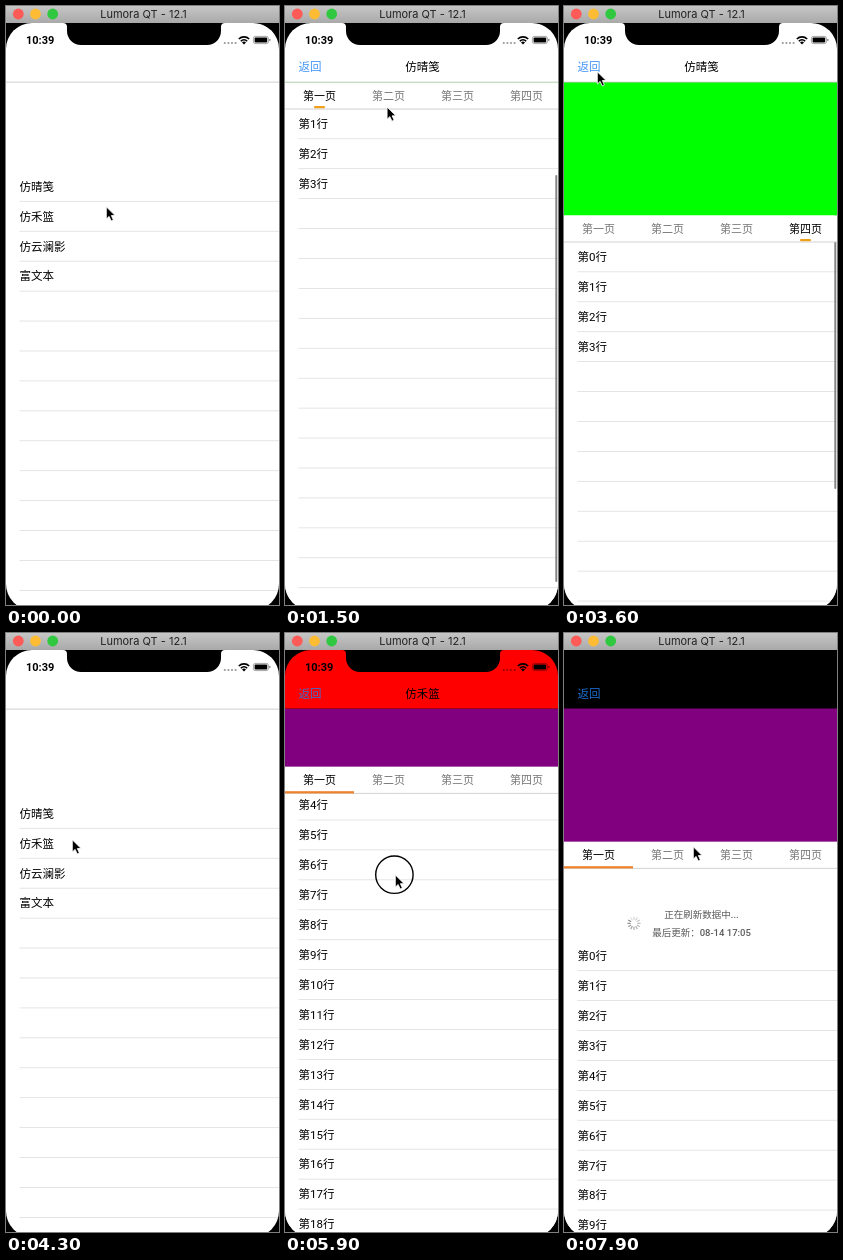
Recreate the animation shown at these times as an HTML page. Size 273x599 px, loop 8 s.

```html
<!DOCTYPE html>
<html lang="zh-CN">
<head>
<meta charset="utf-8">
<style>
  html, body { margin: 0; width: 100%; height: 100%; overflow: hidden; background: #000; }
  svg { display: block; width: 100%; height: 100%; }
  text { font-family: Roboto, "Noto Sans CJK SC", "Noto Sans CJK", sans-serif; font-size: 11.5px; white-space: pre; }
  .mid { text-anchor: middle; }
  .title { font-weight: 500; }
  .clock { font-size: 11px; font-weight: 700; }
  .tab { font-size: 11px; }
  .note { font-size: 9.5px; font-weight: 500; fill: #5a5a5a; }
  .window { font-family: Inter, sans-serif; font-size: 11px; fill: #222; }
</style>
</head>
<body>
<svg viewBox="0 0 273 599" xmlns="http://www.w3.org/2000/svg">
  <defs>
    <linearGradient id="chrome" x2="0" y2="1">
      <stop stop-color="#c6c6c6"/><stop offset="1" stop-color="#a9a9a9"/>
    </linearGradient>
    <clipPath id="screen"><rect y="17" width="273" height="587" rx="26"/></clipPath>
    <clipPath id="pane"><rect y="75" width="273" height="530"/></clipPath>
  </defs>
  <rect width="273" height="599"/>
  <g clip-path="url(#screen)">
    <rect y="76" width="273" height="530" fill="#fff"/>
    <g id="views"></g>
    <g id="navWhite">
      <rect y="17" width="273" height="59" fill="#fff"/>
      <rect y="75.7" width="273" height=".8" fill="#c4c4c4"/>
    </g>
    <rect id="navRed" y="17" width="273" height="58.5" fill="#f00"/>
    <text id="back" x="13.5" y="65.3" fill="#2080f4">返回</text>
    <text id="titleA" class="mid title" x="137.5" y="65.3">仿晴笺</text>
    <text id="titleB" class="mid title" x="137.5" y="65.3">仿禾篮</text>
    <text class="clock" x="20" y="38">10:39</text>
    <path d="M218.8 37h12" stroke="#000" stroke-opacity=".4" stroke-width="2.2" stroke-linecap="round" stroke-dasharray="0 3.6"/>
    <path d="M232.8 33a7.4 7.4 0 0 1 10.4 0M234.8 35.2a4.6 4.6 0 0 1 6.4 0" fill="none" stroke="#000" stroke-width="1.6"/>
    <path d="M238 38.6l-2-2a2.8 2.8 0 0 1 4 0z"/>
    <rect x="247.4" y="30.4" width="15" height="7.2" rx="2" fill="none" stroke="#000" stroke-opacity=".45" stroke-width=".8"/>
    <rect x="248.6" y="31.6" width="12.6" height="4.8" rx="1"/>
    <rect x="263.3" y="32.7" width="1.1" height="2.6" rx=".5" opacity=".5"/>
    <path d="M57 16v1q4 0 4 4v4a14 14 0 0 0 14 14h126a14 14 0 0 0 14-14v-4q0-4 4-4v-1z"/>
  </g>
  <rect width="273" height="17" fill="url(#chrome)"/>
  <circle cx="12.3" cy="8" r="5.4" fill="#fc5b57"/>
  <circle cx="29.5" cy="8" r="5.4" fill="#fdbc34"/>
  <circle cx="46.7" cy="8" r="5.4" fill="#2fc840"/>
  <text class="mid window" x="137.5" y="12.2">Lumora QT - 12.1</text>
  <g id="cursor">
    <circle id="ring" cx="-.6" cy=".6" r="18.7" fill="none" stroke="#000" stroke-width="1.4"/>
    <path transform="translate(.3 .8) scale(.94)" d="M0 0v13l3-2.800 2.200 4.800 2.300-1-2.100-4.700h4z" stroke="#fff" stroke-width=".9"/>
  </g>
</svg>
<script>
const LOOP = 8000, W = 273, NAV = 76, ROW = 29.93, TAB_H = 26.5, TAB_GAP = 69;
const TOP_A = 209.5, TOP_B = 208.8, FOLD_A = 133, FOLD_B = 75, REFRESH = 72.5;
const PUSH = 350, SLIDE = 250;

const $ = id => document.getElementById(id);
const clamp = v => Math.max(0, Math.min(1, v));
const mix = (a, b, u) => a + (b - a) * u;
const phase = (t, start, length) => {
  const u = clamp((t - start) / (length || 1));
  return u * u * (3 - 2 * u);
};

function add(parent, tag, attrs, label) {
  const node = document.createElementNS('http://www.w3.org/2000/svg', tag);
  for (const key in attrs) node.setAttribute(key, attrs[key]);
  if (label !== undefined) node.textContent = label;
  return parent.appendChild(node);
}
const set = (node, key, value) => node.setAttribute(key, value);
const move = (node, x, y) => set(node, 'transform', `translate(${x.toFixed(2)} ${y.toFixed(2)})`);
const fade = (node, value) => set(node, 'opacity', value);
const tabX = i => TAB_GAP * (i + .5);

// Gestures drive the pointer, the press ring, scrolling and navigation.
const drag = (at, length, x, y, dy) => ({ at, length, end: at + length, x, y, dy });
const tap = (at, x, y) => drag(at, 100, x, y, 0);
const hover = (at, x, y) => drag(at, 0, x, y, 0);
const pulled = (g, t) => g.dy * phase(t, g.at, g.length);

const openA = tap(330, 62, 184);
const foldA = drag(1045, 450, 104, 265, -163);
const tabTaps = [1, 2, 3].map(i => tap(1011 + 560 * i, tabX(i) - 16, 89));
const unfoldA = drag(3200, 200, 195, 120, FOLD_A);
const closeA = tap(3650, 33, 65);
const openB = tap(4200, 66, 206);
const dragsB = [
  drag(4695, 300, 81, 463, -159),
  drag(5300, 280, 90, 420, -120),
  drag(5700, 450, 110, 160, 193),
  drag(6400, 600, 121, 152, 166)
];
const release = dragsB[3].end;
const gestures = [hover(0, 100, 200), openA, foldA, ...tabTaps, unfoldA, closeA, openB,
  ...dragsB, hover(7950, 129, 213)];

function pointerAt(t) {
  const i = gestures.findLastIndex(g => g.at <= t);
  const now = gestures[i], next = gestures[i + 1] || now;
  const y = now.y + pulled(now, t);
  const start = Math.max(now.end, next.at - 300);
  const u = next === now ? 0 : phase(t, start, next.at - 50 - start);
  return { x: mix(now.x, next.x, u), y: mix(y, next.y, u), pressed: t < now.end };
}

function addList(parent, labels, lines) {
  const list = add(parent, 'g', {});
  for (let i = 0; i < lines; i++) {
    if (labels[i]) add(list, 'text', { x: 13.5, y: i * ROW + 19.2 }, labels[i]);
    add(list, 'rect', { x: 13.5, y: (i + 1) * ROW - .5, width: W - 13.5, height: .8, fill: '#dedede' });
  }
  return list;
}
const rowLabels = n => Array.from({ length: n }, (_, i) => `第${i}行`);

function addTabs(parent, marker) {
  const group = add(parent, 'g', {});
  add(group, 'rect', { width: W, height: TAB_H, fill: '#fff' });
  add(group, 'rect', { y: TAB_H - .4, width: W, height: .8, fill: '#c8c8c8' });
  const labels = [...'一二三四'].map((n, i) =>
    add(group, 'text', { class: 'mid tab', x: tabX(i), y: 17 }, `第${n}页`));
  return {
    group,
    marker: add(group, 'rect', { height: 2.2, ...marker }),
    select: index => labels.forEach((label, i) => set(label, 'fill', i === index ? '#000' : '#777'))
  };
}

function addView(color) {
  const view = add($('views'), 'g', { 'clip-path': 'url(#pane)' });
  add(view, 'rect', { y: NAV, width: W, height: 530, fill: '#fff' });
  const body = add(view, 'g', {});
  const header = add(view, 'rect', { y: NAV - .5, width: W, fill: color });
  return { view, body, header };
}

const home = addList($('views'), ['仿晴笺', '仿禾篮', '仿云澜影', '富文本'], 15);

const a = addView('#0f0');
const pages = [0, 1, 2, 3].map(() => addList(a.body, rowLabels(4), 18));
const scrollbar = add(a.body, 'rect', { x: 270.3, width: 2, height: 407, rx: 1, fill: '#858585' });
const tabsA = addTabs(a.view, { y: 23.6, width: 11, rx: 1, fill: '#f0a01c' });

// Black from the top edge: the red bar fades out over it.
const b = addView('#800080');
const listB = addList(b.body, rowLabels(30), 30);
const refresh = add(listB, 'g', {});
const status = add(refresh, 'text', { class: 'note mid', x: 137.5, y: -23.2 });
add(refresh, 'text', { class: 'note mid', x: 137.5, y: -5.2 }, '最后更新：08-14 17:05');
const arrow = add(refresh, 'path', { d: 'M0-9V8M-4 4L0 8l4-4', fill: 'none', stroke: '#777', 'stroke-width': 1.6 });
const spinner = add(refresh, 'g', {});
for (let i = 0; i < 12; i++) {
  add(spinner, 'rect', { x: -.6, y: -6.8, width: 1.2, height: 3.6, rx: .6, fill: '#777',
    opacity: .25 + i * .055, transform: `rotate(${i * 30})` });
}
const tabsB = addTabs(b.view, { y: 24.4, width: TAB_GAP, fill: '#f0802a' });
tabsB.select(0);

function drawA(t, shown) {
  const scroll = -pulled(foldA, t);
  const lift = Math.min(scroll, FOLD_A) - pulled(unfoldA, t);
  const page = tabTaps.reduce((sum, g) => sum + phase(t, g.end, SLIDE), 0);
  const top = TOP_A - lift;
  move(a.view, (1 - shown) * W, 0);
  pages.forEach((list, i) => move(list, (i - page) * W, TOP_A + TAB_H - (i ? lift : scroll)));
  set(scrollbar, 'y', NAV + .57 * (page < 1 ? scroll : lift));
  fade(scrollbar, [foldA, unfoldA].some(g => t > g.at && t < g.end + 300) ? 1 : 0);
  set(a.header, 'height', Math.max(0, top - NAV + .5));
  move(tabsA.group, 0, top);
  set(tabsA.marker, 'x', 29 + TAB_GAP * (page + .1 * Math.sin(Math.PI * (page % 1))));
  tabsA.select(Math.ceil(page));
}

function drawB(t, shown) {
  const settle = (80 - REFRESH) * phase(t, release, 200);
  const scroll = settle - dragsB.reduce((sum, g) => sum + pulled(g, t), 0);
  const top = TOP_B - Math.max(0, Math.min(scroll, FOLD_B));
  const loading = t >= release, ready = scroll < -REFRESH;
  move(b.view, (1 - shown) * W, 0);
  move(listB, 0, TOP_B + TAB_H - scroll);
  set(b.header, 'height', top - NAV + .5);
  move(tabsB.group, 0, top);
  status.textContent = loading ? '正在刷新数据中...' : ready ? '松开立即刷新' : '下拉可以刷新';
  fade(refresh, scroll < 0 ? 1 : 0);
  fade(arrow, loading ? 0 : 1);
  fade(spinner, loading ? 1 : 0);
  set(arrow, 'transform', `translate(70 -17.5) rotate(${ready ? 180 : 0})`);
  set(spinner, 'transform', `translate(70 -17.5) rotate(${Math.floor(t / 83) * 30})`);
  fade($('navWhite'), 1 - shown);
  fade($('navRed'), shown * clamp(scroll / 30));
  fade($('titleB'), shown * clamp(scroll / FOLD_B));
}

function draw(t) {
  const shownA = phase(t, openA.end, PUSH) - phase(t, closeA.end, PUSH);
  const shownB = phase(t, openB.end, PUSH);
  const pointer = pointerAt(t);
  move(home, -.3 * W * Math.max(shownA, shownB), 165.5);
  drawA(t, shownA);
  drawB(t, shownB);
  fade($('titleA'), shownA);
  fade($('back'), .85 * Math.max(shownA, shownB));
  move($('cursor'), pointer.x, pointer.y);
  fade($('ring'), pointer.pressed ? 1 : 0);
}

const start = performance.now();
function tick(now) {
  draw(Math.max(0, now - start) % LOOP);
  requestAnimationFrame(tick);
}
draw(0);
requestAnimationFrame(tick);
</script>
</body>
</html>
```
